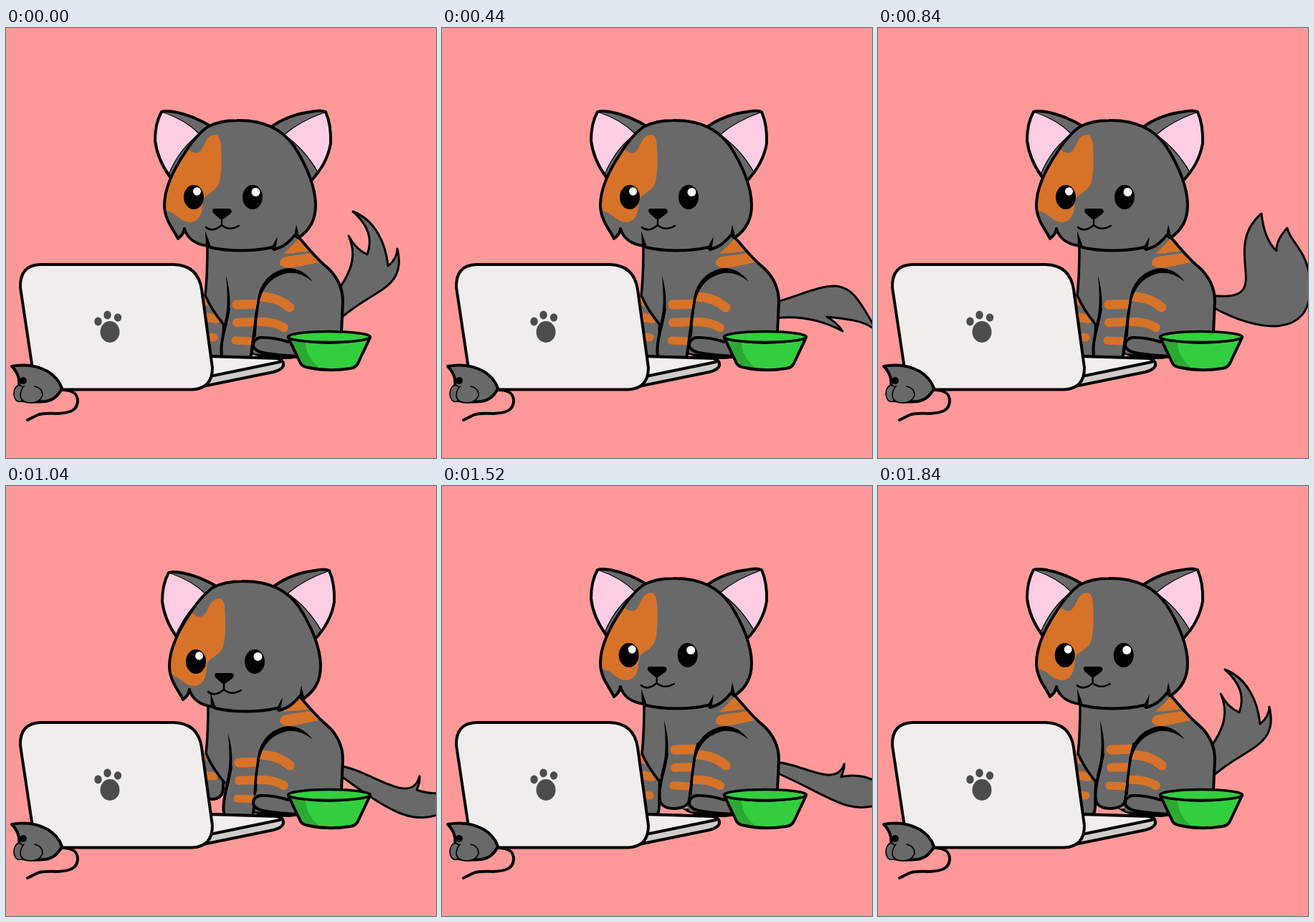
Animation of 600x600 px, one loop 2640 ms. Source, as an HTML page with a canvas:

```html
<!DOCTYPE html>
<html lang="en">
<head>
<meta charset="utf-8">
<title>Cat at a laptop</title>
<style>
html, body { margin: 0; width: 100%; height: 100%; overflow: hidden; background: #ff9999; }
canvas { display: block; width: 600px; height: 600px; }
</style>
</head>
<body>
<canvas id="stage" width="600" height="600"></canvas>
<script>
const ctx = document.getElementById('stage').getContext('2d');
const LOOP = 2640, STEP = 40;
const BG = '#ff9999', FUR = '#696969', ORANGE = '#d77329', PINK = '#ffcee4';
const INK = '#000', SHELL = '#efeeec', GREEN = '#33ce3f';

ctx.lineCap = ctx.lineJoin = 'round';

function shape(d, fill, line, width = 4) {
  const path = new Path2D(d);
  if (fill) { ctx.fillStyle = fill; ctx.fill(path); }
  if (line) { ctx.strokeStyle = line; ctx.lineWidth = width; ctx.stroke(path); }
}

function oval(x, y, rx, ry, fill, line, width) {
  ctx.beginPath();
  ctx.ellipse(x, y, rx, ry, 0, 0, Math.PI * 2);
  if (fill) { ctx.fillStyle = fill; ctx.fill(); }
  if (line) { ctx.strokeStyle = line; ctx.lineWidth = width; ctx.stroke(); }
}

function at(dx, dy, draw, clip) {
  ctx.save();
  ctx.translate(dx, dy);
  if (clip) ctx.clip(new Path2D(clip));
  draw();
  ctx.restore();
}

// Tail poses share one path structure, so they can be blended number by number.
const tailUp = 'M460 370C487 335 488 312 478 290Q488 309 504 316C514 290 500 270 484 256C515 268 530 300 533 332Q546 322 546 308C560 365 510 365 466 406';
const tailArch = 'M458 366C470 340 480 326 499 319Q495 326 493 333C560 278 588 330 600 388C594 389 587 387 582 384Q585 394 596 401C535 410 520 305 466 387';
const tailOut = 'M464 383C500 373 527 359 550 360Q566 362 576 374C590 390 597 408 612 430C598 408 570 407 537 403Q551 411 559 423C535 410 505 400 464 405';
const tailLow = 'M464 390C510 397 566 448 577 405Q578 413 573 424C590 430 605 430 625 426C622 434 618 440 612 446Q615 449 612 456C570 470 550 466 464 402';
const tailCurl = 'M464 373C560 385 475 310 535 259Q539 295 556 311C556 298 562 289 571 279C575 298 596 308 602 345Q604 352 603 362C604 430 535 428 464 388';

const tailKeys = [
  [0, tailUp], [240, tailUp], [340, tailArch], [440, tailOut], [600, tailLow],
  [800, tailCurl], [840, tailCurl], [1040, tailLow], [1480, tailLow],
  [1680, tailArch], [1840, tailUp], [LOOP, tailUp]
];

function blend(a, b, k) {
  const goal = b.match(/\d+/g);
  let i = 0;
  return a.replace(/\d+/g, n => (+n + (goal[i++] - n) * k).toFixed(2));
}

function tailAt(t) {
  const i = tailKeys.findIndex((key, n) => n > 0 && t <= key[0]);
  const [t0, a] = tailKeys[i - 1], [t1, b] = tailKeys[i];
  return blend(a, b, (t - t0) / (t1 - t0));
}

function ease(t, from, to) {
  const k = Math.min(1, Math.max(0, (t - from) / (to - from)));
  return (1 - Math.cos(Math.PI * k)) / 2;
}

function stripe(x0, y0, x1, y1, width = 12) {
  shape(`M${x0} ${y0}L${x1} ${y1}`, null, ORANGE, width);
}

function farLeg() {
  const leg = 'M272 365L304 405L303 447Q303 464 287 464Q272 463 270 445Z';
  shape(leg, FUR);
  at(0, 0, () => {
    stripe(272, 378, 283, 382);
    stripe(272, 402, 293, 406);
    stripe(272, 430, 290, 432, 11);
  }, leg);
  shape(leg, null, INK);
}

function nearLeg() {
  shape('M308 345C316 378 312 392 304 425Q299 445 300 457Q303 468 322 468Q340 467 342 456Q344 440 347 420Q349 395 354 375L345 350Z', FUR);
  shape('M322 386L360 385', null, ORANGE, 13);
  shape('M322 411L348 410', null, ORANGE, 12);
  shape('M320 436L340 437', null, ORANGE, 11);
  shape('M307 345C309 375 311 392 302 422L306 424C314 396 315 374 307 345Z', INK);
  shape('M311 392C308 410 298 440 301 457Q304 468 322 468Q340 467 342 456Q344 440 347 420Q349 395 354 378', null, INK);
}

function body(t) {
  const settle = ease(t, 840, 1040);
  const farLift = settle - ease(t, 1040, 1240);
  const nearLift = ease(t, 1040, 1240);

  shape('M335 450Q350 463 395 462L412 460L412 450Z', INK);
  at(0, 0, () => at(0, -27 * farLift, farLeg), 'M0 374H600V600H0Z');
  shape('M281 295L405 288C420 305 433 322 447 333C463 347 470 365 470 382L468 425L395 459L346 454L335 436L306 418Q287 395 278 373Q281 345 281 295Z', FUR);
  shape('M410 291L424 311Q405 314 387 315Q400 304 410 291Z', ORANGE);
  shape('M391 319Q412 316 427 314L440 326Q415 332 396 335Q382 334 382 327Q383 321 391 319Z', ORANGE);
  shape('M405 288C420 305 433 322 447 333C463 347 470 365 470 382L468 425', null, INK);
  at(settle, 0, () => shape('M281 300Q281 348 278 373Q287 394 304 414', null, INK, 3.5));
  at(settle * 3, -18 * nearLift, nearLeg);

  // Haunch and hind foot
  shape('M352 382C354 354 375 337 400 338C430 342 458 375 460 425L420 455L368 455Q344 452 344 442Q345 434 350 426Z', FUR);
  shape('M357 375Q380 376 396 390', null, ORANGE, 13);
  shape('M353 410Q373 409 388 418', null, ORANGE, 12);
  shape('M350 392C349 360 367 338 394 335Q414 335 428 354Q411 340 393 342C371 347 356 360 352 392Z', INK);
  shape('M352 382Q348 406 347 430', null, INK, 3.5);
  shape('M394 438Q372 431 354 432Q344 435 345 444Q348 452 364 454Q382 457 408 458', FUR, INK);
}

const skull = 'M322 129C360 128 386 142 402 165C419 191 432 222 432 247C432 267 425 281 408 293L403 289C393 301 386 306 374 309L371 306C345 312 310 312 285 306L281 304C265 302 253 294 249 280Q248 288 240 294C234 281 221 268 221 247C221 225 233 199 249 175C260 157 269 147 281 138Q298 129 322 129Z';
const tufts = 'M405 274L410 294L402 291ZM379 291L376 311L370 307ZM278 283L287 308L279 305Z';

function leftEar() {
  const outline = 'M229 208Q211 183 208 157Q208 133 217 117Q222 115 235 117Q263 122 290 140L262 190Z';
  shape(outline, FUR);
  shape('M219 117Q250 128 270 148Q243 167 227 204Q211 183 208 157Q208 133 219 117Z', PINK);
  shape('M220 118Q250 128 270 148Q243 167 227 204', null, INK, 1.3);
  shape(outline, null, INK);
}

function rightEar() {
  const outline = 'M425 214Q448 190 453 161Q454 135 446 117Q440 114 425 117Q394 121 370 138L400 190Z';
  shape(outline, FUR);
  shape('M445 118Q410 130 388 149Q416 168 435 201Q449 183 453 161Q454 137 445 118Z', PINK);
  shape('M444 118Q410 130 388 149Q416 168 435 201', null, INK, 1.3);
  shape(outline, null, INK);
}

function face() {
  oval(262, 236, 14, 17, INK);
  oval(266.5, 228, 5.5, 5.8, '#fff');
  oval(344, 236, 14, 17, INK);
  oval(348.5, 229, 6, 6, '#fff');
  shape('M290 252H312Q318 255 312 260L304 266Q301 268 298 266L290 259Q286 254 290 252Z', INK);
  shape('M301 265V275M279 278Q288 286 301 275Q311 284 325 276', null, INK, 2.5);
}

function head(t) {
  const nod = ease(t, 840, 1040) - ease(t, 1040, 1240);
  const look = -1.3 * ease(t, 1040, 1240);
  at(10 * nod, 4 * nod, leftEar);
  at(5 * nod, nod, rightEar);
  at(7 * nod, 4 * nod, () => {
    shape(skull, FUR);
    at(0, 0, () => at(-1.5 * nod, 4 * nod, () => shape(
      'M210 246L252 165Q258 176 268 174C278 169 277 149 292 149Q299 149 300 165C301 185 301 205 297 217C291 231 277 231 275 241C274 255 272 270 257 271C243 271 238 257 222 255L210 260Z',
      ORANGE)), skull);
    shape(skull, null, INK);
    shape(tufts, INK);
  });
  at(3 * nod + look, 9 * nod, face);
}

function laptop() {
  shape('M280 458L378 461Q388 463 387 471Q385 477 373 480L270 501Z', '#cfcdca', INK);
  shape('M280 458L378 461Q386 463 382 466L280 487Z', SHELL, INK);
  shape('M48 330H234Q268 331 273 365L288 474Q288 503 260 504.5H60Q41 503 38 482L20 362Q19 331 48 330Z', SHELL, INK);
  const paw = '#4c4c4c';
  oval(145, 424, 13.5, 15, paw);
  oval(128.5, 409.5, 5.2, 6, paw);
  oval(141.5, 400.5, 5.2, 6, paw);
  oval(156, 404, 5.2, 5.8, paw);
}

function toyMouse() {
  shape('M78 505C95 505 100 511 100 521C99 533 91 537 72 538Q51 537 44 540L30 547', null, INK);
  shape('M8 472Q36 467 58 479Q73 488 78 503Q70 519 55 521Q33 523 19 519L18 490Q16 480 8 472Z', FUR, INK);
  oval(18.5, 510, 7.5, 11.5, FUR, INK, 1.7);
  shape('M20 514Q20 500 31 499Q50 500 51 513Q47 523 34 523Q22 523 20 514Z', FUR);
  shape('M40 500Q51 502 51 513Q47 523 34 523Q22 523 20 514Q20 505 25 500', null, INK, 1.7);
  oval(24, 492, 5, 5, INK);
}

function bowl() {
  const side = 'M394 432L411 468Q414 473 423 474Q450 480 480 475Q488 474 491 468L508 432Q450 446 394 432Z';
  shape(side, GREEN);
  shape('M394 432L413 472L440 476Q418 460 418 438Z', '#2ca933');
  shape(side, null, INK);
  oval(451, 431, 57.5, 7.5, GREEN, INK, 3.5);
}

function draw(t) {
  ctx.fillStyle = BG;
  ctx.fillRect(0, 0, 600, 600);
  shape(tailAt(t), FUR, INK, 3);
  body(t);
  laptop();
  head(t);
  bowl();
  toyMouse();
}

const start = performance.now();
function frame() {
  const t = (performance.now() - start) % LOOP;
  draw(Math.floor(t / STEP) * STEP);
  requestAnimationFrame(frame);
}
frame();
</script>
</body>
</html>
```
